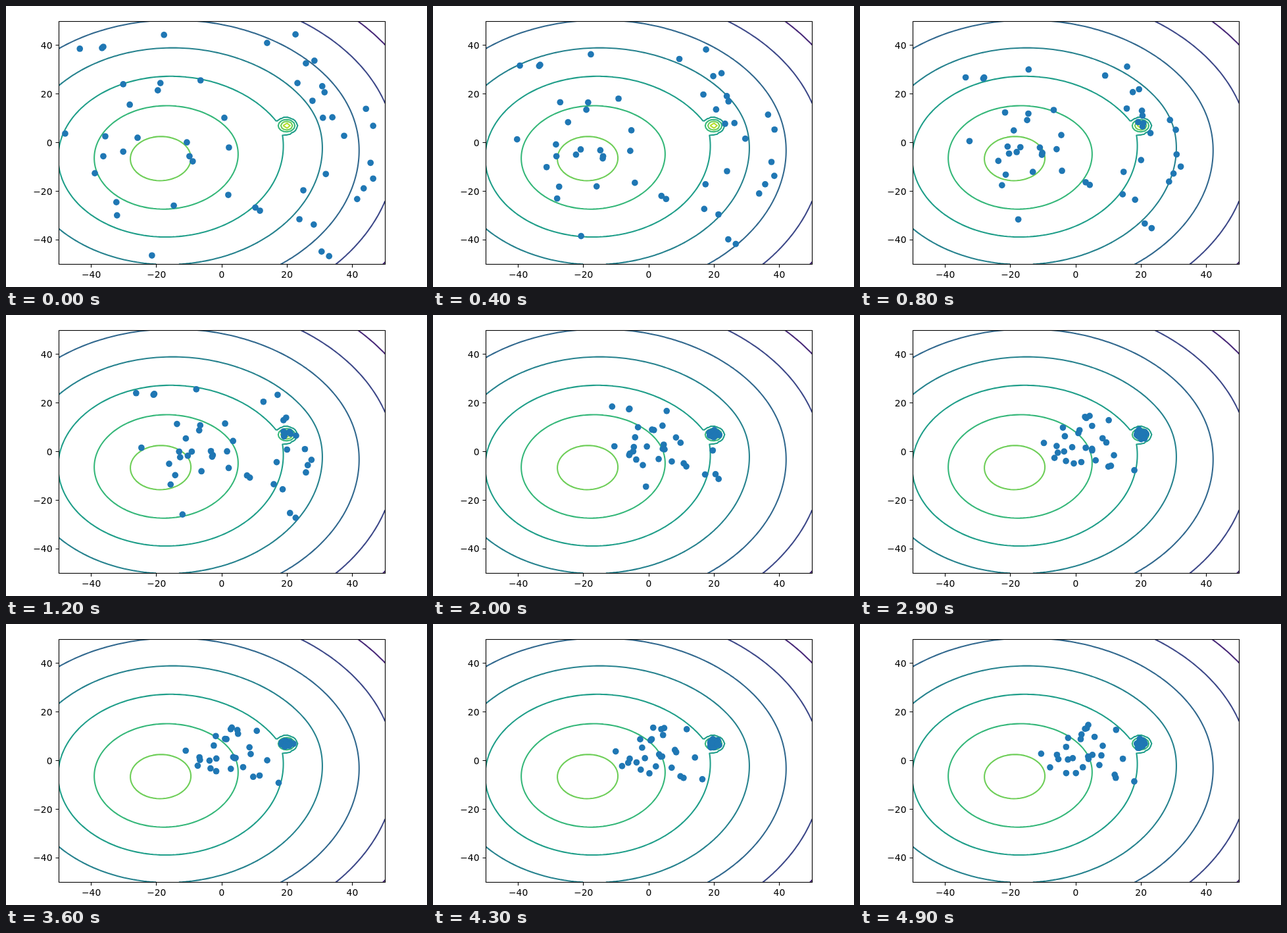
An HTML page for the animation above (5000 ms loop, 640 by 427 pixels).

```html
<!DOCTYPE html>
<html lang="en">
<head>
<meta charset="utf-8">
<title>Swarm on a contour map</title>
<style>
  html, body { margin: 0; width: 100%; height: 100%; overflow: hidden; background: #fff; }
  svg { display: block; width: 100vw; height: 100vh; }
  text { font: 13.89px "DejaVu Sans", sans-serif; }
</style>
</head>
<body>
<svg id="stage" viewBox="0 0 640 427">
  <clipPath id="inside"><rect x="80" y="23" width="496.5" height="369.5"/></clipPath>
  <g id="lines" clip-path="url(#inside)" fill="none" stroke-width="2.08" stroke-linecap="round"></g>
  <g id="dots" fill="#1f77b4"></g>
  <rect x="80.5" y="23.5" width="496" height="369" fill="none" stroke="#000" stroke-width="1.1"/>
  <g id="axes"></g>
</svg>
<script>
const LIMIT = 50, STEP_MS = 100, STEPS = 50;
const STRIDE = 2, FOUND = 6;            // units per step; step at which the peak is found
const HILL = [-20, -7], PEAK = [20, 7]; // the broad top and the sharp one
const LURE = [-18, -5.6];               // where the swarm heads at first
const $ = id => document.getElementById(id);
const toX = x => 328 + x * 4.96;
const toY = y => 207.6 - y * 3.695;
const gap = (a, b) => Math.hypot(b[0] - a[0], b[1] - a[1]);

function add(parent, tag, attrs, text) {
  const el = document.createElementNS("http://www.w3.org/2000/svg", tag);
  for (const k in attrs) el.setAttribute(k, attrs[k]);
  if (text) el.textContent = text;
  parent.appendChild(el);
  return el;
}

// Depth below the tops: a wide tilted cone with a narrow one set into it.
function depth(x, y) {
  const near = gap([x, y], PEAK);
  return gap([x, y], HILL) + 0.145 * near - 16.3 * Math.max(0, 3.45 - near);
}

// Marching squares on a grid of one unit.
function contour(level) {
  let d = "";
  for (let x = -LIMIT; x < LIMIT; x++) {
    for (let y = -LIMIT; y < LIMIT; y++) {
      const corners = [[x, y], [x + 1, y], [x + 1, y + 1], [x, y + 1]];
      const h = corners.map(c => depth(...c) - level);
      const cuts = [];
      corners.forEach((a, i) => {
        const j = (i + 1) % 4, b = corners[j];
        if (h[i] < 0 === h[j] < 0) return;
        const u = h[i] / (h[i] - h[j]);
        cuts.push(toX(a[0] + (b[0] - a[0]) * u).toFixed(2) + " " + toY(a[1] + (b[1] - a[1]) * u).toFixed(2));
      });
      for (let i = 0; i < cuts.length; i += 2) d += "M" + cuts[i] + "L" + cuts[i + 1];
    }
  }
  return d;
}

["#482878", "#3e4989", "#31688e", "#26828e", "#1f9e89", "#35b779", "#6ece58", "#b5de2b"]
  .forEach((stroke, i) => add($("lines"), "path", { d: contour(90.98 - 12.62 * i), stroke }));

for (const n of [-40, -20, 0, 20, 40]) {
  const label = String(n).replace("-", "\u2212");
  const x = toX(n), y = toY(n);
  const tx = Math.floor(x) + 0.5, ty = Math.floor(y) + 0.5;
  add($("axes"), "path", { d: `M${tx} 392.5v5M80.5 ${ty}h-5`, stroke: "#000", "stroke-width": 1.1 });
  add($("axes"), "text", { x, y: 413, "text-anchor": "middle" }, label);
  add($("axes"), "text", { x: 70.5, y: Math.round(y + 5), "text-anchor": "end" }, label);
}

// Starting places, x and y in axis units.
const start = [-43.5,38.6, -36.7,38.9, -36.3,39.4, -17.7,44.3, 13.9,41, 22.6,44.5, 25.8,32.6, 28.4,33.7,
  23.2,24.5, 30.8,23.2, 31.5,20.7, 27.8,17.2, -30.2,24, -18.8,24.5, -19.6,21.5, -6.5,25.6, -28.2,15.6,
  0.8,10.2, 31,10.2, 33.9,10.4, 37.5,2.8, 44.2,13.9, 46.4,6.9, -48,3.7, -35.7,2.6, -25.8,2, -36.3,-5.6,
  -30.2,-3.7, -10.7,0.1, -9.9,-5.6, -8.9,-7.7, 2.2,-2, -38.9,-12.6, -32.3,-24.5, -32.1,-29.9,
  -14.7,-25.9, 2,-21.5, 10.3,-26.7, 11.7,-28, -21.4,-46.4, 25,-19.6, 23.8,-31.5, 28.2,-33.7,
  31.9,-12.9, 45.6,-8.3, 46.4,-14.8, 43.5,-18.8, 41.5,-23.2, 30.6,-44.8, 32.9,-46.7];

function noise(i, s) {
  const v = Math.sin(i * 127.1 + s * 311.7) * 43758.5453;
  return v - Math.floor(v);
}

// Walk a length toward a goal, but no closer than stop.
function walk(from, goal, length, stop) {
  const far = gap(from, goal);
  const room = Math.max(0, far - stop);
  const u = Math.min(length, room) / far;
  return { at: from.map((v, k) => v + (goal[k] - v) * u), idle: length > room };
}

const swarm = Array.from({ length: start.length / 2 }, (_, i) => {
  const home = [start[2 * i], start[2 * i + 1]];
  const [x, y] = home;
  // Those from the right reach the peak; the others stall on the way.
  const stop = x + 0.3 * y > 17
    ? 1.2 * noise(i, 99)
    : 4 + 0.4 * gap(home, PEAK) * (1 - Math.abs(y / LIMIT) ** 3);
  return { home, stop, dot: add($("dots"), "circle", { r: 4.86 }) };
});

function position({ home, stop }, i, s) {
  const first = walk(home, LURE, STRIDE * Math.min(s, FOUND), 4).at;
  if (s <= FOUND) return first;
  const { at, idle } = walk(first, PEAK, STRIDE * (s - FOUND), stop);
  if (!idle) return at;
  const r = 1.3 * Math.sqrt(noise(i, s)), a = 2 * Math.PI * noise(i + 50, s);
  return [at[0] + r * Math.cos(a), at[1] + r * Math.sin(a)];
}

function draw(ms) {
  const s = Math.floor(ms / STEP_MS) % STEPS;
  swarm.forEach((worm, i) => {
    const [x, y] = position(worm, i, s);
    worm.dot.setAttribute("cx", toX(x).toFixed(2));
    worm.dot.setAttribute("cy", toY(y).toFixed(2));
  });
}

const begin = performance.now();
function tick() {
  draw(performance.now() - begin);
  requestAnimationFrame(tick);
}
tick();
</script>
</body>
</html>
```
